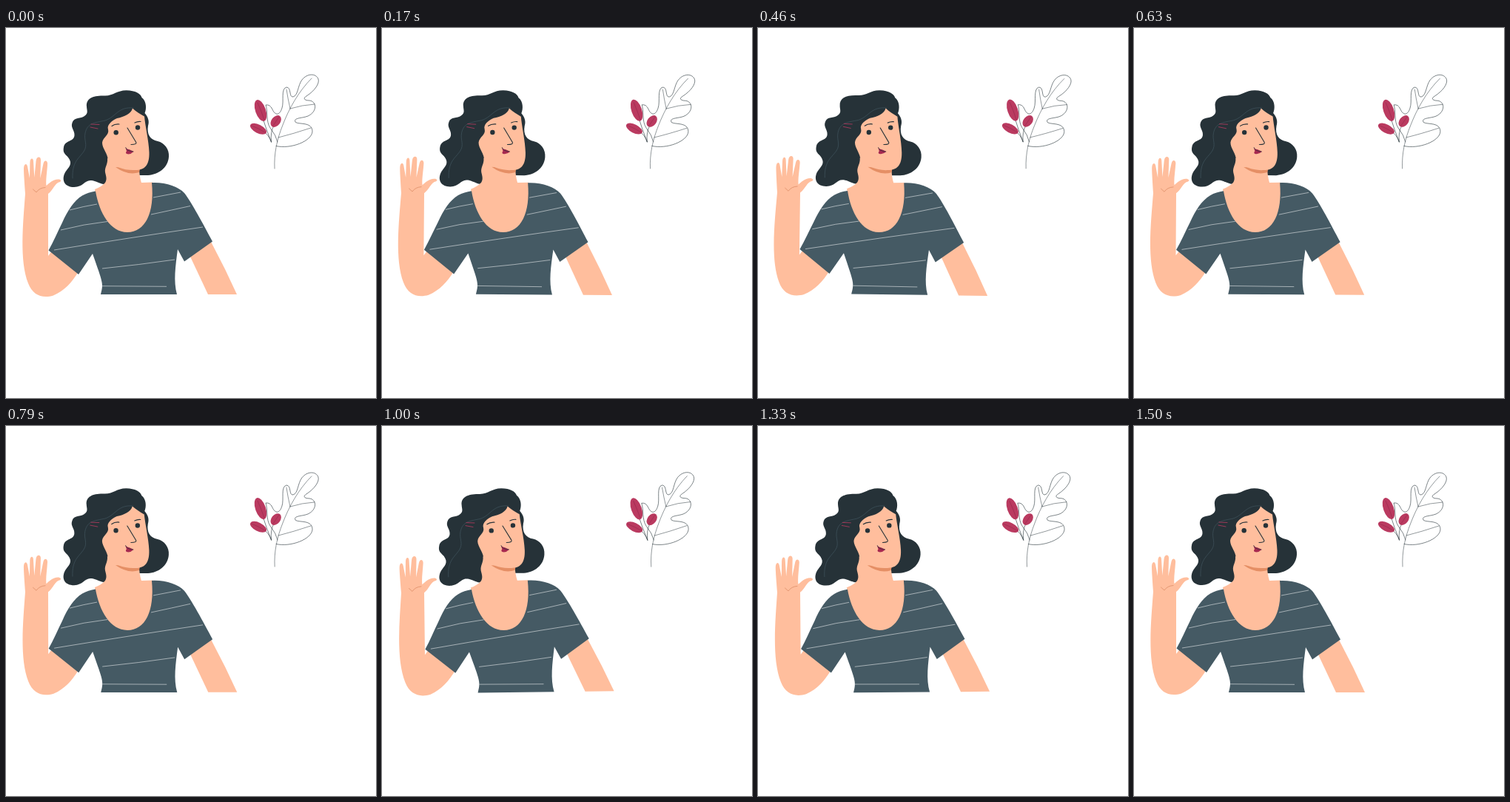
An HTML page for the animation above (1.54 s loop, 500x500 px).

```html
<!DOCTYPE html>
<html lang="en">
<head>
<meta charset="utf-8">
<title>Waving woman</title>
<style>
  html, body { margin: 0; width: 100%; height: 100%; overflow: hidden; background: #fff; }
  svg { display: block; width: 100vw; height: 100vh; }
  .skin { fill: #ffbe9d; }
  .hair { fill: #263238; }
  .shirt { fill: #455a64; }
  .berry { fill: #ba3a60; }
  .line { fill: none; stroke: #263238; stroke-linecap: round; stroke-linejoin: round; }
</style>
</head>
<body>
<svg viewBox="0 0 500 500">
  <g id="woman">
    <!-- arms -->
    <path class="skin" d="M26 224C25 210 24 196 24 190C24 183 28 182 29 187L32 203L32.400 182C32.500 175 37 175 37 180L38.300 202L40.500 180C41 173 47.500 173 47 179L46.300 203L50.300 184C51.500 177 57 179 56 185C55.500 194 53.500 206 54.500 213C58 210 64 203.500 72 204.500Q76 206 73 208C66 209 64 219 57 224V308L66 296L98 329C89 344 79 355 64 361.500C49 366 36 361 30 345C18 314 23 264 26 224Z"/>
    <path class="skin" d="M249 309L273 360H312L296 326L276 287Z"/>
    <path class="line" stroke-width=".7" style="stroke:#d98760" d="M36.500 218L41 222Q45 216 53 215.500"/>

    <!-- hair, neck and face -->
    <path class="hair" d="M109 106C108 95 118 91 133 91.500C145 92 150 84 163 84.300C175 84.500 182 89 183.500 94C190 99 190 109 187.500 115C192 120 194 126 192 132C190 144 195 151 205 153C214 155 221 164 220 174C219 189 206 198 192 199H178L142 188L139 208C136 211 132 212 128 210C122 208 119 206 114 206C106 206 104 215 92 215C80 215 75 207 79 197C82 190 90 186 86 178C83 171 76 171 78 161C80 151 92 154 92.500 145C93 138 87 135 89.500 128C92 120 101 123 106 119C112 115 109 111 109 106Z"/>
    <path class="skin" d="M137 176C138 184 133 188 134 195C135 200 137 204 134 209Q130 214 120 218C124 255 143 279 164 279C190 279 202 250 198 208.500L183 209Q180 200 180 188Z"/>
    <path fill="#e58f65" d="M148 188L181 190L180 195Q165 200 148 188Z"/>
    <path class="skin" d="M138 137C136 131 143 125 150 122C160 120 169 116 171 108.500C176 113 181 116 187 119.500C188 132 193 152 193.500 168C194 186 187 192 175 192C160 193 147 187 138 180C138 170 130 163 130 155C131 147 140 145 138 137Z"/>
    <path class="line" stroke-width=".6" style="stroke:#455a64" d="M172 108C151 106 149 120 134 125C120 128 110 128 107 142C105 152 111 158 105 167C98 177 89 181 90 203"/>
    <path class="line" stroke-width=".8" style="stroke:#ba3a60" d="M115 130L126 130.500M114 134L124 136"/>
    <circle class="hair" cx="148.700" cy="141.200" r="3.200"/>
    <circle class="hair" cx="178" cy="134.500" r="3.200"/>
    <path class="line" stroke-width="1.200" d="M143 132.500Q147 129.500 153 130M174 128Q178 126 182 126.500"/>
    <path class="line" stroke-width="1.100" d="M164 135L175.500 154Q177.500 157.500 169 157.500"/>
    <path fill="#a62950" d="M161.500 161.500Q163.500 164 166 164Q168 164.500 172.500 167Q168 171.500 163 170Q161 168.500 163 166.500Z"/>
    <path class="line" stroke-width=".7" d="M161.700 161.500Q163 166.500 172 167"/>

    <!-- shirt -->
    <path class="shirt" d="M121 220.500C126 250 141 276 164 276C188 276 201 250 197 209C215 208 233 214 241 223C251 236 266 264 279 288.500L241 315.500L232 299C229 322 226 342 231 360H128C132 345 131 345 117 305L98 333L57.500 300.500C64 289 70 275 76 263C83 247 92 233 103 226.500Q111 222 121 220.500Z"/>
    <path fill="none" stroke="#fff" stroke-opacity=".8" stroke-width=".65" d="M86 246Q105 241 123 238M74 273Q105 265 137 261.500M65 300Q170 283 266 269M196 252Q224 246 249 240.500M199 229L236 222M130 325Q180 320 228 313M130 348.700L217 349.300"/>
  </g>

  <g id="leaf">
    <path class="line" stroke-width=".6" d="M365 159.500C385 164 413 153 414 140C414 126 395 131 391 127C388 121 401 122 408 119C421 113 420 99 410 98C403 98 401 95 406 92C417 85 424 75 422 69C419 61 407 61 400 70C394 78 395 91 388 93C382 94 386 80 379 80C371 82 376 99 373 108C370 118 364 119 360 110Q357 103 351 104C354 112 351 126 357 135Q365 145 367 154"/>
    <path class="line" stroke-width=".5" d="M363 190C362 170 366 151 374 131C382 110 395 86 413 68M384 109Q400 104 417 103M384 109Q381 96 379 83M368 148Q388 143 412 135"/>
    <path class="line" stroke-width=".6" d="M347 122Q352 138 358.500 154M362 132Q357 140 358.500 154M348 140Q355 144 358.500 154"/>
    <g class="berry">
      <ellipse cx="344" cy="111.500" rx="7" ry="15.200" transform="rotate(-19 344 111.500)"/>
      <ellipse cx="364.700" cy="126" rx="6" ry="8.800" transform="rotate(38 364.700 126)"/>
      <ellipse cx="341" cy="136.300" rx="5.800" ry="12" transform="rotate(-63 341 136.300)"/>
    </g>
    <path class="line" stroke-width=".5" style="stroke:#8c2546" d="M340 101Q345 112 349 124M369 120L361 132M332 132Q342 136 350 141"/>
  </g>
</svg>
<script>
  const LOOP = 1540, PERIOD = 1500, STEP = 1000 / 24;
  const woman = document.getElementById("woman");
  const leaf = document.getElementById("leaf");

  // Triangle wave in degrees: 0, +1 at a quarter, -1 at three quarters
  function sway(ms) {
    const p = (ms / PERIOD) % 1;
    return p < 0.25 ? p * 4 : p < 0.75 ? 2 - p * 4 : p * 4 - 4;
  }

  function turn(part, deg, x, y) {
    part.setAttribute("transform", `rotate(${deg.toFixed(4)} ${x} ${y})`);
  }

  function draw(now) {
    const tick = Math.min(36, Math.floor((now % LOOP + 5) / STEP));
    const deg = sway(tick * STEP);
    turn(woman, deg, 167, 224);
    turn(leaf, deg, 376, 126.5);
  }

  function loop() {
    draw(performance.now());
    requestAnimationFrame(loop);
  }
  loop();
</script>
</body>
</html>
```
